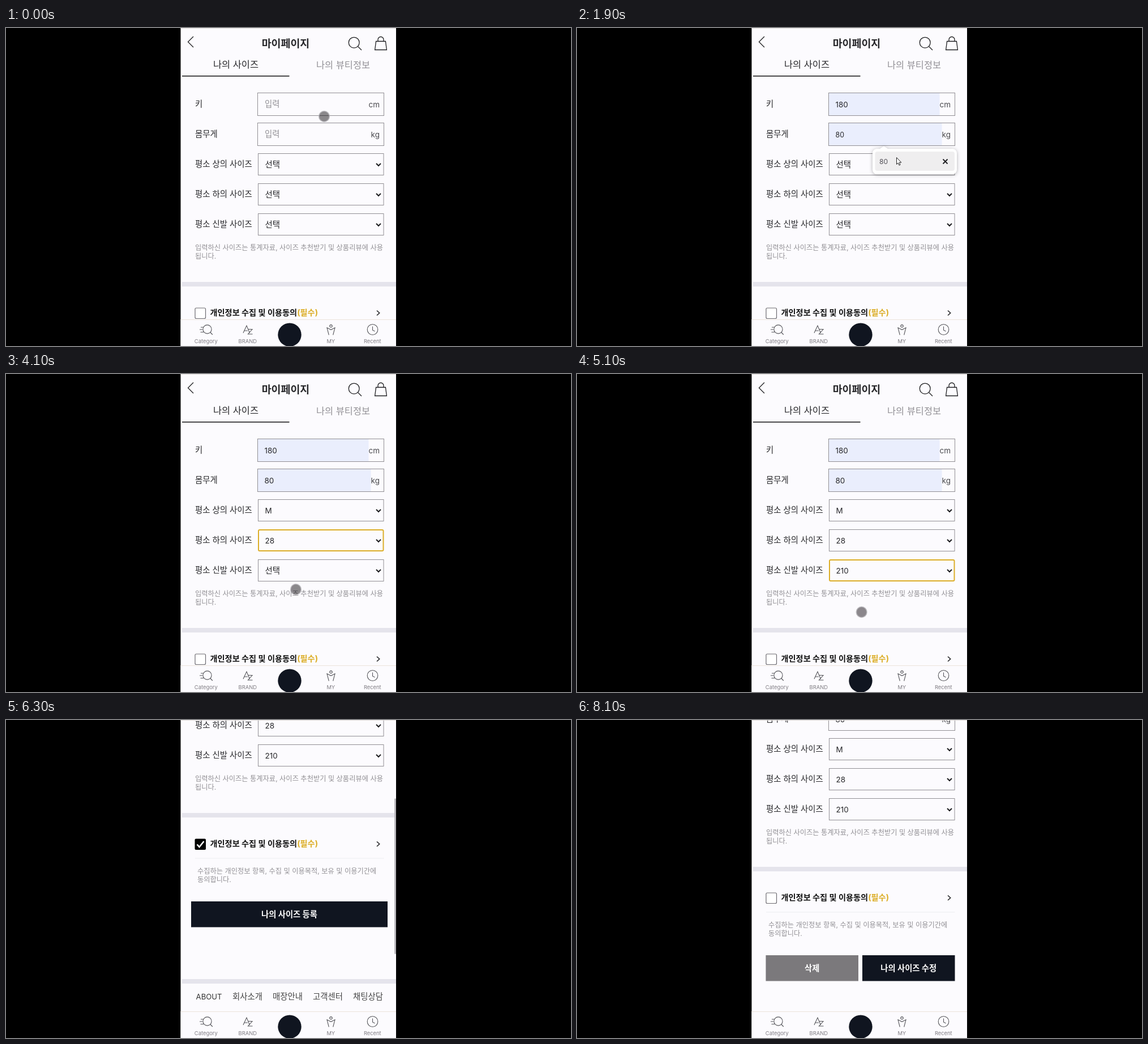
Write an HTML page that moves like this. It is 998 by 561 pixels and loops after 9200 ms.

```html
<!DOCTYPE html>
<html lang="ko">
<head>
<meta charset="utf-8">
<title>마이페이지</title>
<style>
html, body { margin: 0; width: 100%; height: 100%; overflow: hidden; background: #000; }
svg { display: block; width: 998px; height: 561px; }
text { font-family: Inter, "Noto Sans CJK KR", "Noto Sans CJK", sans-serif; white-space: pre; }
.line { fill: none; stroke: #1d1d20; stroke-width: 1.3; }
.thin { fill: none; stroke: #55555a; stroke-width: 1.1; }
.shadow { filter: drop-shadow(0 1px 3px rgba(0, 0, 0, .3)); }
</style>
</head>
<body>
<svg id="stage" viewBox="0 0 998 561"></svg>
<script>
const LOOP = 9200, STEP = 100;
const INK = '#27272a', GREY = '#929095', NAVY = '#101520', GOLD = '#dcae28', PAPER = '#fcfbfe';
const LATIN = 13.5, KOREAN = 14.4;
const stage = document.getElementById('stage');

// y is the optical middle of the line
function text(x, y, str, { size, fill = INK, weight = 400, anchor = 'start' } = {}) {
  size = size || (/[가-힣]/.test(str) ? KOREAN : LATIN);
  return `<text x="${x}" y="${y + size * .37}" font-size="${size}" fill="${fill}" ` +
    `font-weight="${weight}" text-anchor="${anchor}">${str}</text>`;
}
const rect = (x, y, w, h, fill, extra = '') =>
  `<rect x="${x}" y="${y}" width="${w}" height="${h}" fill="${fill}" ${extra}/>`;
const path = (d, cls = 'line', extra = '') => `<path d="${d}" class="${cls}" ${extra}/>`;
const circle = (x, y, r, cls = 'line') => `<circle cx="${x}" cy="${y}" r="${r}" class="${cls}"/>`;
const mid = { anchor: 'middle' };

const header =
  path('M331 15 321.5 24.5 331 34') +
  text(494, 27, '마이페이지', { ...mid, size: 18.4, weight: 700 }) +
  circle(614.7, 25.7, 9.4) + path('M621.5 32.5 628 39') +
  path('M653.6 23.5H670.4L672.4 38.5H651.6ZM657 23.5V20.5a5 5 0 0 1 10 0V23.5') +
  text(406, 64, '나의 사이즈', { ...mid, size: 16.4 }) +
  text(595.5, 65, '나의 뷰티정보', { ...mid, size: 16.4, fill: GREY }) +
  rect(311, 84, 189.5, 1.5, '#111');

const divider = y => rect(311, y, 378, 8, '#e5e4ec');
const small = (x, y, str) => text(x, y, str, { size: 12.25, fill: GREY });

const labels = ['키', '몸무게', '평소 상의 사이즈', '평소 하의 사이즈', '평소 신발 사이즈']
  .map((s, i) => text(334, 134 + 53 * i, s)).join('');

const fixedPage = header + labels +
  small(334, 387, '입력하신 사이즈는 통계자료, 사이즈 추천받기 및 상품리뷰에 사용') +
  small(334, 402, '됩니다.') +
  divider(448) +
  text(360.5, 502, `개인정보 수집 및 이용동의<tspan fill="${GOLD}">(필수)</tspan>`,
    { size: 14.2, weight: 700, fill: '#111' }) +
  path('M655 498.5 659.7 502.7 655 507', 'line', 'style="stroke-width:1.5"') +
  rect(334, 527.5, 333.5, 1, '#eeedf2') +
  small(338, 550.5, '수집하는 개인정보 항목, 수집 및 이용목적, 보유 및 이용기간에') +
  small(338, 565.5, '동의합니다.') +
  divider(741) +
  text(358.5, 772.5, 'ABOUT', { ...mid, size: 13.1, fill: '#333' }) +
  ['회사소개', '매장안내', '고객센터', '채팅상담']
    .map((s, i) => text(426.5 + 71 * i, 772, s, { ...mid, fill: '#444' })).join('');

const nav = rect(308, 514, 381, 47, PAPER) + rect(308, 514, 381, 1, '#ebe4dc') +
  path('M344 528H349M342 532H347M343.5 536.5H349', 'thin') +
  circle(355.5, 531.5, 7.6, 'thin') + path('M361 537 364.8 541', 'thin') +
  path('M419 538 425 525 430.5 538M421 534H427M427.5 531.5H435L427.5 540H435.5', 'thin') +
  circle(574, 525.8, 2.2, 'thin') +
  path('M570.3 541.5 567 528.8 574 532.3 581 528.8 577.7 541.5', 'thin') +
  circle(647.5, 532, 9.3, 'thin') + path('M647.5 526.5V533L651.5 535', 'thin') +
  ['Category', 'BRAND', '', 'MY', 'Recent']
    .map((s, i) => text(353.3 + 73.5 * i, 553, s, { ...mid, size: 9.4, fill: '#807e84' })).join('') +
  `<circle cx="501" cy="541.2" r="20.7" fill="${NAVY}"/>`;

// Number inputs: suggestion opens, is hovered, is chosen
const inputs = [
  { unit: 'cm', value: '180', fillTo: 640.5, open: 400, hover: 600, pick: 1000 },
  { unit: 'kg', value: '80', fillTo: 644.5, open: 1400, hover: 1700, pick: 2300 }
];
const run = (from, count, by) => Array.from({ length: count }, (_, i) => String(from + i * by));
const selects = [
  { list: ['선택', 'XXS 이하', 'XS', 'S', 'M', 'L', 'XL', 'XXL 이상'], value: 'M', open: 2500, pick: 3100, blur: 3500 },
  { list: ['선택', ...run(24, 10, 1)], value: '28', open: 3500, pick: 4000, blur: 4300 },
  { list: ['선택', ...run(210, 8, 5)], value: '210', open: 4400, pick: 4900, blur: 5300 }
];
const CHECK = 5600, BUTTON_GONE = 6500, RELOAD = 7800;

// time, x, y, shape
const pointer = [
  [0, 562, 156, 'dot'], [200, 562, 140, 'dot'], [500, 562, 137, 'arrow'],
  [600, 564, 175, 'arrow'], [1000, 564, 175, 'dot'], [1300, 562, 190, 'dot'],
  [1600, 563, 208, 'arrow'], [1700, 564, 228, 'arrow'], [2200, 564, 228, 'arrow'],
  [2300, 560, 232, 'dot'], [2500, 530, 241, 'arrow'], [2600, 505, 270, 'arrow'],
  [2800, 497, 369.5, 'arrow'], [3000, 497, 369.5, 'arrow'], [3100, 500, 370, 'dot'],
  [3400, 508, 295, 'dot'], [3500, 507, 297, 'arrow'], [3800, 505, 440, 'arrow'],
  [4000, 510, 430, 'dot'], [4100, 512, 380, 'dot'], [4300, 512, 348, 'dot'],
  [4400, 511, 350, 'arrow'], [4600, 509, 398, 'arrow'], [4900, 508, 400, 'dot'],
  [5200, 500, 430, 'dot'], [5500, 380, 315, 'dot'], [5600, 343, 330, 'dot'],
  [5800, 412, 451, 'dot'], [6000, 440, 453, 'dot'], [6300, 440, 453, '']
];
const scrolls = [[0, 0], [5200, 0], [5500, 173], [5900, 173], [6200, 284], [7700, 284], [8100, 189]];

function sample(keys, t) {
  let i = keys.length - 1;
  while (keys[i][0] > t) i--;
  const a = keys[i], b = keys[i + 1] || a;
  const k = b === a ? 0 : (t - a[0]) / (b[0] - a[0]);
  return a.map((v, n) => typeof v === 'number' ? v + (b[n] - v) * k : v);
}

function drawInput(f, i, t) {
  const y = 114.5 + 53 * i, chosen = t >= f.pick, shown = t >= f.hover;
  const tinted = shown && t < RELOAD;
  return (tinted ? rect(445, y, f.fillTo - 445, 40, '#eaeefd') : '') +
    (shown ? text(456.5, y + 20.5, f.value, { size: chosen ? LATIN : 12.4 })
           : text(457, y + 19.5, '입력', { fill: GREY })) +
    text(660, y + 20.7, f.unit, { anchor: 'end', fill: '#4a4a4e' }) +
    rect(444.5, y, 223, 40, 'none', 'stroke="#918f94"');
}

function drawSelect(s, i, t) {
  const y = 221.5 + 53 * i, open = t >= s.open && t < s.pick, ring = t >= s.pick && t < s.blur;
  const frame = ring
    ? rect(446, y + .5, 220.5, 37, 'none', `rx="2" stroke="${GOLD}" stroke-width="2"`)
    : rect(445.5, y, 221.5, 38, 'none', `stroke="${open ? '#111' : '#918f94'}"`);
  const value = t >= s.pick ? s.value : '선택';
  return frame + text(457.5, y + (t >= s.pick ? 19.7 : 19), value) +
    path(`M654 ${y + 17.5}l4 4 4-4`, 'line', 'style="stroke-width:2"');
}

function drawList(s, i, t, py) {
  if (t < s.open || t >= s.pick) return '';
  const top = 260 + 53 * i;
  let y = top, rows = '';
  for (const item of s.list) {
    const h = /[가-힣]/.test(item) ? 25.7 : 23.5, hot = py >= y && py < y + h;
    if (hot) rows += rect(445, y, 221, h, '#b0e1f2');
    rows += text(457, y + h / 2 + .6, item, { fill: hot ? '#fff' : INK });
    y += h;
  }
  const box = (fill, extra) => rect(444.5, top - .5, 222, y - top + 1, fill, extra);
  return box(PAPER, 'class="shadow"') + rows + box('none', 'stroke="#77757a"');
}

function drawHint(f, i, t) {
  if (t < f.open || t >= f.pick) return '';
  return `<g transform="translate(0 ${53 * (i - 1)})">` +
    `<path class="shadow" fill="#fff" d="M530 213H535L542 208.5 549 213H663a8 8 0 0 1 8 8V250a8 8 0 0 1-8 8H530a8 8 0 0 1-8-8V221a8 8 0 0 1 8-8Z"/>` +
    (t >= f.hover ? rect(526.5, 218, 140.5, 34, '#efeeef', 'rx="4"') : '') +
    text(534, 235.5, f.value, { size: 12.2, fill: '#55535a' }) +
    path('M646.5 231.5l8 8m0-8l-8 8', 'line', 'style="stroke-width:1.8"') + '</g>';
}

function drawCheck(t) {
  return t >= CHECK && t < RELOAD
    ? rect(333.5, 493.5, 19.5, 19.5, '#000', 'rx="2"') +
      path('M337.5 503.5l4 4.5 8-10', 'line', 'style="stroke:#fff;stroke-width:2.6"')
    : rect(334, 494, 18.5, 18.5, '#fff', 'rx="2" stroke="#6c6a70" stroke-width="1.2"');
}

function button(x, w, fill, label) {
  return rect(x, 604, w, 45.5, fill) +
    text(x + w / 2, 626.3, label, { ...mid, size: 14.3, fill: '#fff', weight: 700 });
}
function drawButtons(t) {
  if (t >= RELOAD) {
    return button(333.5, 163.5, '#7b797c', '삭제') + button(504, 163.5, NAVY, '나의 사이즈 수정');
  }
  return t < BUTTON_GONE ? button(327, 347, NAVY, '나의 사이즈 등록') : '';
}

function drawPointer(x, y, shape) {
  if (shape === 'dot') {
    return `<circle cx="${x}" cy="${y}" r="9.2" fill="rgba(15,10,15,.48)" stroke="rgba(175,173,178,.6)" stroke-width="2"/>`;
  }
  return shape ? `<path transform="translate(${x} ${y})" d="M.5 .5V12.5L3.2 10 5 14.2 7 13.3 5.2 9.2H8.8Z" fill="#fff" stroke="#222"/>` : '';
}

function drawScrollbar(t, s) {
  const on = (t > 5200 && t < 6500) || (t >= RELOAD && t < 8100);
  return on ? rect(686, s * 561 / 1149, 3, 274, '#b9b7bc') : '';
}

function draw(t) {
  const s = sample(scrolls, t)[1], [, px, py, shape] = sample(pointer, t);
  stage.innerHTML =
    '<defs><clipPath id="phone"><path d="M308.5 0H689V561H308.5Z"/></clipPath></defs>' +
    '<g clip-path="url(#phone)">' + rect(308, 0, 381, 561, PAPER) +
    `<g transform="translate(0 ${-s})">` + fixedPage +
    inputs.map((f, i) => drawInput(f, i, t)).join('') +
    selects.map((f, i) => drawSelect(f, i, t)).join('') +
    drawCheck(t) + drawButtons(t) + '</g>' +
    rect(308, 0, 381, 1, '#e6e1df') + nav + drawScrollbar(t, s) +
    inputs.map((f, i) => drawHint(f, i, t)).join('') +
    selects.map((f, i) => drawList(f, i, t, py)).join('') +
    drawPointer(px, py, shape) + '</g>';
}

const start = performance.now();
let last = -1;
function tick() {
  const t = Math.floor(((performance.now() - start) % LOOP) / STEP) * STEP;
  if (t !== last) draw(last = t);
  requestAnimationFrame(tick);
}
tick();
</script>
</body>
</html>
```
